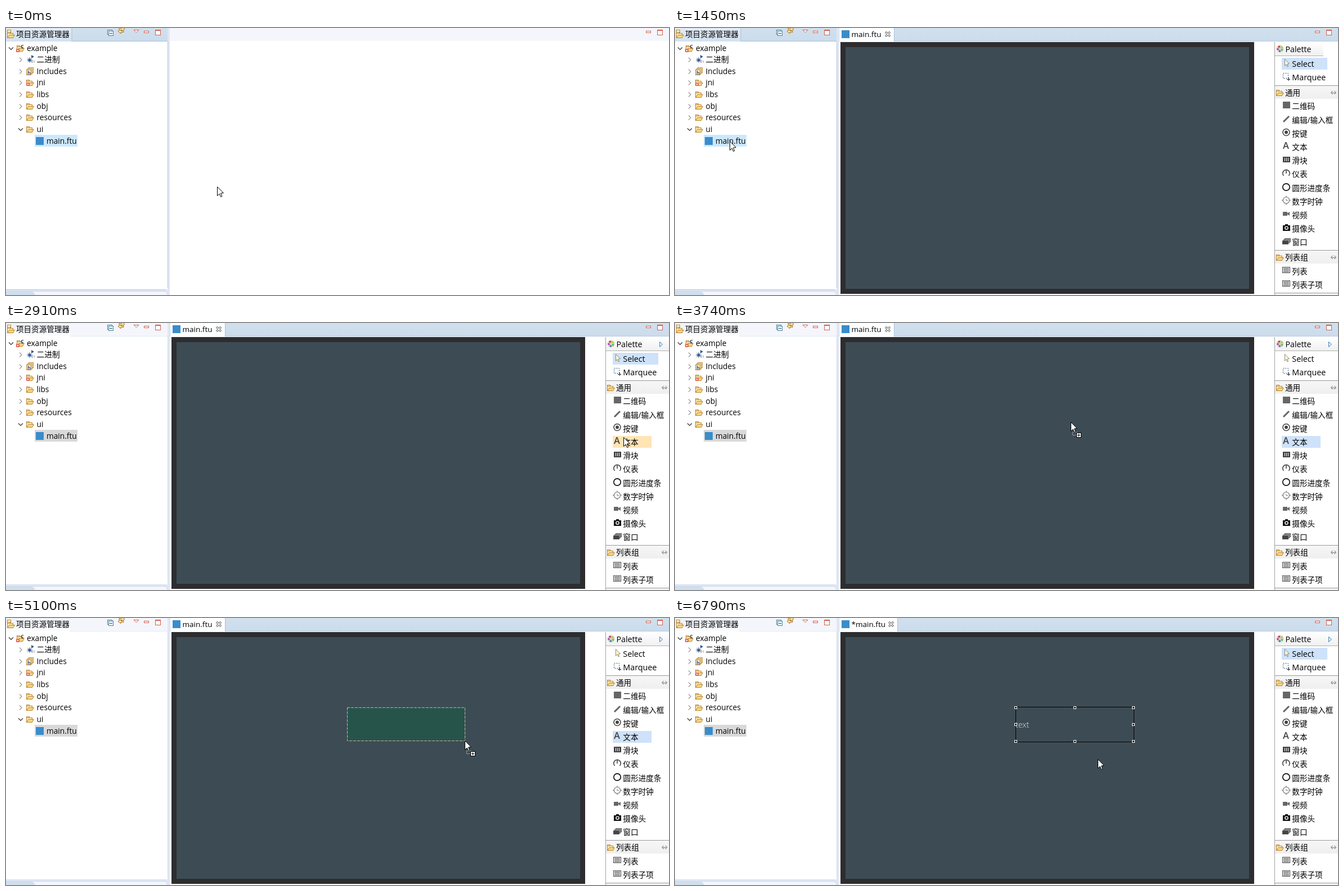
Animation, 1178 px wide and 475 px high, one loop 7290 ms. Source, as an HTML page with a canvas:

```html
<!DOCTYPE html>
<html lang="zh-CN">
<head>
<meta charset="utf-8">
<style>
html, body { margin: 0; width: 100%; height: 100%; overflow: hidden; background: #fff; }
canvas { display: block; }
</style>
</head>
<body>
<canvas id="stage" width="1178" height="475"></canvas>
<script>
const g = document.getElementById('stage').getContext('2d');
const LOOP = 7290, STEP = 68;
const FONT = '"Open Sans", "Noto Sans CJK SC", "Noto Sans CJK", sans-serif';

// When the window changes
const BUSY = 1200, OPEN = 1450, FOCUS = 1520, LEAVE = 1950, PICK = 3290,
  PRESS = 4140, RELEASE = 5280, PLACED = 5470, DIRTY = 5490, RESIZE = 5850, AWAY = 6410;

const HOME = { x: 375, y: 282 };
const MOVES = [
  { from: 250, to: 700, x: 97, y: 201 },
  { from: LEAVE, to: 2660, x: 1094, y: 201 },
  { from: 2730, to: 2910, x: 1097, y: 203 },
  { from: PICK, to: 4000, x: 643, y: 174 },
  { from: 4070, to: PRESS, x: 606, y: 159 },
  { from: PRESS, to: 4770, x: 811, y: 208 },
  { from: 4840, to: 5100, x: 815, y: 218 },
  { from: AWAY, to: 6790, x: 751, y: 251 }
];

const easeOut = k => 1 - (1 - k) ** 2;

// The pointer jumps in even ticks along slightly bowed, slowing strokes
function pointerAt(t) {
  let { x, y } = HOME;
  for (const m of MOVES) {
    if (t < m.from) break;
    const span = m.to - m.from, n = Math.round(span / STEP);
    const tick = Math.floor((t - m.from) / span * n) + 1;
    const k = easeOut(Math.min(1, tick / (n + 1)));
    const dx = m.x - x, bow = (dx / 204) ** 2;
    x += dx * k;
    y += (m.y - y) * k - bow * Math.sin(Math.PI * k);
  }
  return [Math.round(x), Math.round(y)];
}

function box(x, y, w, h, color) {
  g.fillStyle = color;
  g.fillRect(x, y, w, h);
}

function frame(x, y, w, h, color, dash = []) {
  g.setLineDash(dash);
  g.strokeStyle = color;
  g.lineWidth = 1;
  g.strokeRect(x + .5, y + .5, w - 1, h - 1);
  g.setLineDash([]);
}

function card(x, y, w, h, fill, edge) {
  box(x, y, w, h, fill);
  frame(x, y, w, h, edge);
}

function fade(x, y, w, h, top, bottom) {
  const f = g.createLinearGradient(0, y, 0, y + h);
  f.addColorStop(0, top);
  f.addColorStop(1, bottom);
  box(x, y, w, h, f);
}

function shape(pts, fill, stroke, width = 1, closed = true) {
  g.beginPath();
  for (let i = 0; i < pts.length; i += 2) g.lineTo(pts[i], pts[i + 1]);
  if (closed) g.closePath();
  if (fill) { g.fillStyle = fill; g.fill(); }
  if (stroke) { g.strokeStyle = stroke; g.lineWidth = width; g.stroke(); }
}

const line = (pts, color, width = 1) => shape(pts, null, color, width, false);

function arc(x, y, r, color, width, from = 0, to = 2 * Math.PI) {
  g.beginPath();
  g.arc(x, y, r, from, to);
  g.strokeStyle = color;
  g.lineWidth = width;
  g.stroke();
}

function dot(x, y, r, color) {
  g.beginPath();
  g.arc(x, y, r, 0, 2 * Math.PI);
  g.fillStyle = color;
  g.fill();
}

function panel(x, y, w, fill, edge) {
  g.beginPath();
  g.roundRect(x, y, w, 20, 6);
  g.fillStyle = fill;
  g.fill();
  g.strokeStyle = edge;
  g.lineWidth = 1;
  g.stroke();
}

function text(s, x, y, size = 13.7, color = '#000', weight = 400) {
  g.font = `${weight} ${size}px ${FONT}`;
  g.fillStyle = color;
  g.fillText(s, x, y);
}

// Draws with the origin moved to x, y and scaled
function at(x, y, draw, scale = 1) {
  g.save();
  g.translate(x, y);
  g.scale(scale, scale);
  draw();
  g.restore();
}

function cross(x, y, r, color, width) {
  for (const s of [-r, r]) line([x - s, y - r, x + s, y + r], color, width);
}

function chevron(x, y, r, turn, color, width = 1.2) {
  at(x, y, () => {
    g.rotate(turn);
    line([-r / 2, -r, r / 2, 0, -r / 2, r], color, width);
  });
}

function folder(x, y) {
  card(x, y, 6, 5, '#fdf0c0', '#b9822e');
  card(x, y + 2, 11, 9, '#fdf0c0', '#b9822e');
  shape([x + .8, y + 10.5, x + 3.5, y + 5.5, x + 13.3, y + 5.5, x + 10.5, y + 10.5], '#f9d77f', '#b9822e');
}

function errorMark(x, y) {
  box(x, y, 6, 6, '#e0604c');
  cross(x + 3, y + 3, 1.5, '#fff', 1);
}

function windowButtons(x) {
  card(x, 5, 9, 4, '#fff', '#d0604f');
  card(x + 20, 3, 10, 10, '#fff', '#d0604f');
  box(x + 20, 3, 10, 2, '#d0604f');
}

const fileMark = (x, y) => box(x, y - 7, 14, 14, '#3a8ccb');

const TREE_ICONS = {
  project(x, y) {
    folder(x + 1, y - 5);
    errorMark(x, y + 1);
    text('C', x + 8, y, 9, '#20406e', 700);
  },
  binary(x, y) {
    for (let a = 0; a < 4; a++) {
      const dx = 5 * Math.cos(a * Math.PI / 4), dy = 5 * Math.sin(a * Math.PI / 4);
      line([x + 6 - dx, y + 1 - dy, x + 6 + dx, y + 1 + dy], '#4a648c');
    }
    dot(x + 6, y + 1, 2.6, '#3d5c96');
    shape([x + 9, y - 8, x + 14, y - 5, x + 9, y - 2], '#35588f');
    text('01', x + 9, y + 6, 6, '#555');
  },
  includes(x, y) {
    for (let i = 2; i >= 0; i--) card(x + i * 2, y - 3 - i * 2, 9, 10, '#fff3cf', '#b9822e');
    text('h', x + 2, y + 6, 9, '#274b9f', 700);
  },
  badFolder(x, y) { folder(x, y - 5); errorMark(x, y); },
  folder(x, y) { folder(x, y - 5); },
  file: fileMark
};

const TREE = [
  ['project', 'example', 0, true], ['binary', '二进制', 1], ['includes', 'Includes', 1],
  ['badFolder', 'jni', 1], ['folder', 'libs', 1], ['folder', 'obj', 1],
  ['folder', 'resources', 1], ['folder', 'ui', 1, true], ['file', 'main.ftu', 2]
];

function syncArrows(x, y) {
  at(x, y, () => {
    for (const shift of [-2, 2]) {
      shape([-6, 0, -1, -4, -1, -1.5, 4, -1.5, 4, 1.5, -1, 1.5, -1, 4].map((v, i) => i % 2 ? v + shift : v),
        '#fbe3a0', '#a8742b');
      g.rotate(Math.PI);
      g.translate(0, 4);
    }
  });
}

function explorer(active, picked) {
  box(0, 0, 288, 475, '#fff');
  if (active) {
    fade(0, 0, 288, 23, '#d2e0ed', '#cbdcec');
    fade(0, 0, 117, 24, '#e2ebf5', '#d3e1f0');
    line([117, 0, 117, 23.5, 288, 23.5], '#a9bfd8');
  } else {
    box(0, 0, 288, 23, '#f4f6fc');
    fade(0, 0, 114, 23, '#edf0f7', '#fbfcfe');
    box(114, 23, 174, 1, '#e3e8f2');
  }

  card(2, 3, 7, 10, '#fff3cf', '#b9822e');
  folder(2, 7);
  text('项目资源管理器', 18, 16, 13.55);
  for (const i of [0, 2]) card(180 + i, 3 + i, 9, 9, '#eef8fb', '#4b8199');
  box(184, 9, 5, 1, '#24506b');
  syncArrows(205, 8);
  shape([227, 3.5, 236, 3.5, 231.5, 8], '#fff', '#d0604f');
  windowButtons(245);

  box(51, 190, 76, 21, picked);
  TREE.forEach(([icon, label, depth, open], i) => {
    const x = 18 + depth * 17.5, y = Math.round(35.5 + i * 20.63);
    if (depth < 2) chevron(9 + depth * 17, y + .5, 4, open ? Math.PI / 2 : 0, open ? '#333' : '#999');
    TREE_ICONS[icon](Math.round(x), y);
    text(label, x + 19, y + 5);
  });

  // Lower edge and the next view below
  box(0, 465, 291, 10, '#e0e7f5');
  box(287, 0, 4, 475, '#e0e7f5');
  const edge = active ? '#b4c6dd' : '#d3dceb';
  box(287, 24, 1, 438, edge);
  box(0, 465, 284, 1, edge);
  panel(-8, 468.5, 295, '#f4f6fc', '#cbd7e8');
  panel(-8, 469.5, 59, '#cfdfee', '#cfdfee');
}

function editor(dirty) {
  const name = (dirty ? '*' : '') + 'main.ftu', right = dirty ? 395 : 389;
  fade(291, 0, 887, 23, '#d2e0ed', '#cbdcec');
  box(291, 23, 887, 1, '#b9cbe0');
  fade(292, 0, right - 292, 24, '#fff', '#fbfdff');
  box(right, 0, 1, 24, '#a9bfd8');
  fileMark(296, 11);
  text(name, 313.5, 16, 13.5);
  cross(right - 11, 11, 4, '#666', 3.4);
  cross(right - 11, 11, 3.6, '#fff', 1.4);
  box(294, 25, 735, 448, '#2d2d30');
  box(303, 34, 717, 430, '#3d4c54');
}

function listIcon() {
  frame(-7, -7, 14, 11, '#444');
  for (let y = -5; y < 4; y += 2.5) box(-5, y, 10, 1.3, '#555');
}

// Rows without an icon are drawer headings
const TOOLS = [
  ['Select', () => at(-3, -9, () => arrowShape('#fff7d2', '#6b6751'), .75)],
  ['Marquee', () => {
    frame(-6, -8, 10, 10, '#34516e', [2, 2]);
    box(1, 3, 6, 1, '#222');
    box(4, 0, 1, 6, '#222');
  }],
  ['通用'],
  ['二维码', () => box(-6, -8, 13, 12, '#666')],
  ['编辑/输入框', () => line([-5, 4, 5, -6], '#666', 3)],
  ['按键', () => { arc(0, -1.5, 6, '#444', 1.6); dot(0, -1.5, 3, '#444'); }],
  ['文本', () => text('A', -6, 4, 16.5, '#444', 600)],
  ['滑块', () => {
    box(-6, -7, 13, 10, '#444');
    for (let x = -3; x < 5; x += 3) box(x, -5, 1, 6, '#fff');
  }],
  ['仪表', () => {
    arc(0, -1.5, 6.2, '#444', 1.6, .75 * Math.PI, 2.25 * Math.PI);
    line([0, -7, 0, -1], '#444', 1.6);
  }],
  ['圆形进度条', () => arc(0, -1, 6.2, '#111', 1.7)],
  ['数字时钟', () => {
    arc(0, -1.5, 5.6, '#888', 1.4);
    for (let a = 0; a < 4; a++) dot(7 * Math.cos(a * Math.PI / 2), 7 * Math.sin(a * Math.PI / 2) - 1.5, 1, '#888');
    line([0, -4, 0, -1, 3, -1], '#777');
  }],
  ['视频', () => {
    box(-6, -5, 8, 7, '#666');
    shape([1, -1.5, 6, -5, 6, 2], '#666');
  }],
  ['摄像头', () => {
    box(-6, -6, 13, 10, '#111');
    box(-2, -8, 5, 2, '#111');
    arc(.5, -1.3, 2.6, '#fff', 1.4);
  }],
  ['窗口', () => {
    for (let i = 2; i >= 0; i--) card(-7 + i * 2, -3 - i * 2, 11, 7, i ? '#aaa' : '#444', '#555');
  }],
  ['列表组'],
  ['列表', listIcon],
  ['列表子项', listIcon]
];

function drawer(label, y) {
  fade(1066, y - 12, 112, 23, '#f6f6f6', '#efefef');
  box(1066, y - 13, 112, 1, '#999');
  folder(1068, y - 5);
  text(label, 1084, y + 5, 13.6);
  chevron(1167, y, 3, Math.PI, '#555', 1);
  chevron(1173, y, 3, 0, '#555', 1);
  box(1167, y, 6, 1, '#777');
}

function palette(full, chosen, px, py) {
  box(1029, 24, 149, 451, '#fff');
  box(1065, 25, 1, 450, '#a0a0a0');
  const width = full ? 112 : 86;
  fade(1066, 26, width, 23, '#fff', '#f0f0f0');
  box(1066, 49, width, 1, '#b0b0b0');
  dot(1075, 37, 6.5, '#d8d2b8');
  for (let i = 0; i < 5; i++)
    dot(1075 + 4 * Math.cos(i * 1.25 - 2), 37 + 4 * Math.sin(i * 1.25 - 2), 1.8, `hsl(${i * 72}, 60%, 52%)`);
  text('Palette', 1084.5, 43, 14.2);
  if (full) shape([1161.5, 33.5, 1166.5, 38, 1161.5, 42.5], '#e8f2ff', '#3f7fc0');

  let y = 64 - 24.2;
  for (const [name, icon] of TOOLS) {
    y += icon ? 24.2 : 27;
    if (!icon) { drawer(name, Math.round(y)); continue; }
    const size = /^[A-Z]/.test(name) ? 14.3 : 13.6, top = Math.floor(y - 10.4);
    g.font = `${size}px ${FONT}`;
    const wide = Math.min(100, Math.round(g.measureText(name).width) + 42);
    const over = full && px >= 1078 && px < 1078 + wide && py >= top && py < top + 21;
    if (name === chosen || over) box(1078, top, wide, 21, name === chosen ? '#cee2f9' : '#ffe4b4');
    at(1086, Math.floor(y), icon);
    text(name, 1096.3, Math.round(y) + 5, size);
  }
  box(1066, 471, 112, 1, '#999');
  box(1066, 472, 112, 3, '#f3f3f3');
}

function arrowShape(fill, edge) {
  shape([.5, .5, .5, 16.5, 4.2, 13, 6.6, 18.4, 8.8, 17.6, 6.6, 12, 11.3, 11.5], fill, edge);
}

const arrow = (x, y) => at(x, y, () => arrowShape('#fff', '#000'));

function plusArrow(x, y) {
  frame(x + 3, y + 18, 9, 6, '#ddd', [1, 1]);
  arrow(x, y);
  card(x + 10, y + 19, 9, 9, '#fff', '#000');
  box(x + 12, y + 23, 5, 1, '#000');
  box(x + 14, y + 21, 1, 5, '#000');
}

function resizeArrow(x, y) {
  at(x, y, () => {
    g.rotate(Math.PI / 4);
    line([-7, 0, 7, 0], '#000', 4);
    for (const s of [-1, 1]) shape([s * 9, 0, s * 4, -4, s * 4, 4], '#fff', '#000');
    line([-6, 0, 6, 0], '#fff', 2);
  });
}

function busyRing(x, y) {
  arc(x, y, 7, '#1f86e4', 4.6);
  arc(x, y, 7, '#3cc3f5', 3.4, 2.4, 4.3);
}

function rubberBand(x, y, right, bottom) {
  const w = right - x + 1, h = bottom - y + 1;
  card(x, y, w, h, '#26544b', '#26352f');
  frame(x, y, w, h, '#e3b9b4', [4, 1, 1, 1]);
}

function textWidget() {
  text('text', 605, 195, 14.3, '#e4e7e9', 300);
  frame(605, 158, 211, 63, '#000');
  for (let i = 0; i < 9; i++) {
    if (i === 4) continue;
    card(603 + Math.round(i % 3 * 104.5), 157 + Math.floor(i / 3) * 30, 5, 5, '#222', '#fff');
  }
}

function render(t) {
  const [x, y] = pointerAt(t);
  const focused = t >= FOCUS, placing = t >= PICK && t < PLACED;

  box(0, 0, 1178, 475, '#fff');
  explorer(!focused, t < LEAVE ? '#cce8ff' : '#d9d9d9');
  if (t >= OPEN) {
    editor(t >= DIRTY);
    palette(focused, placing ? '文本' : 'Select', x, y);
    if (t >= PRESS && t < RELEASE) rubberBand(606, 159, x, y);
    if (t >= PLACED) textWidget();
  } else {
    box(291, 0, 887, 23, '#f4f6fc');
  }
  windowButtons(1137);

  if (t >= BUSY && t < OPEN) busyRing(x, y);
  else if (t >= RESIZE && t < AWAY) resizeArrow(x, y);
  else if (placing && t < RELEASE && x < 1065) plusArrow(x, y);
  else arrow(x, y);
}

const start = performance.now();
function tick() {
  render((performance.now() - start) % LOOP);
  requestAnimationFrame(tick);
}
tick();
</script>
</body>
</html>
```
